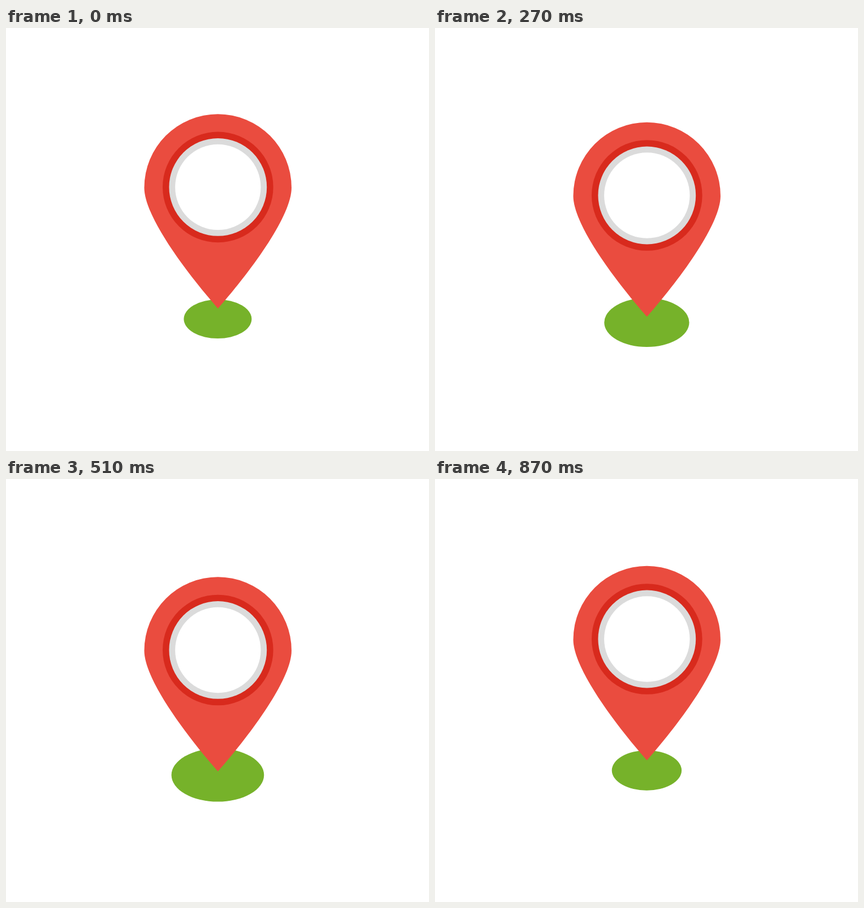
An HTML page for the animation above (0.9 s loop, 748x748 px).

```html
<!DOCTYPE html>
<html lang="en">
<head>
<meta charset="utf-8">
<title>Map pin</title>
<style>
  html, body { margin: 0; width: 100%; height: 100%; overflow: hidden; background: #fff; }
  svg { display: block; width: 100vw; height: 100vh; }
</style>
</head>
<body>
<svg viewBox="0 0 748 748">
  <ellipse id="spot" cx="374.4" fill="#76b22a"/>
  <g id="pin">
    <path fill="#ea4c3f" d="M244.5 282.4A130.2 130.2 0 0 1 504.9 282.4C504.9 330 439.4 422 374.7 496C310 422 244.5 330 244.5 282.4Z"/>
    <circle cx="374.8" cy="281.4" r="97.8" fill="#d82a1d"/>
    <circle cx="374.8" cy="281.4" r="86.4" fill="#dbdbdb"/>
    <circle cx="374.8" cy="281.4" r="75.7" fill="#fff"/>
  </g>
</svg>
<script>
  const LOOP = 900, STEP = 30, DROP = 24.3;
  const pin = document.getElementById('pin');
  const spot = document.getElementById('spot');
  const start = performance.now();

  // The pin falls and rises at constant speed; the spot grows with it.
  function draw(now) {
    const t = Math.floor((Math.max(0, now - start) % LOOP) / STEP) * STEP;
    const phase = 1 - Math.abs(t / (LOOP / 2) - 1);
    const rx = 60 + 25.2 * phase;
    pin.setAttribute('transform', `translate(0 ${DROP * phase})`);
    spot.setAttribute('rx', rx);
    spot.setAttribute('ry', rx * 0.575);
    spot.setAttribute('cy', 514.6 + 10.3 * phase);
    requestAnimationFrame(draw);
  }
  draw(start);
</script>
</body>
</html>
```
